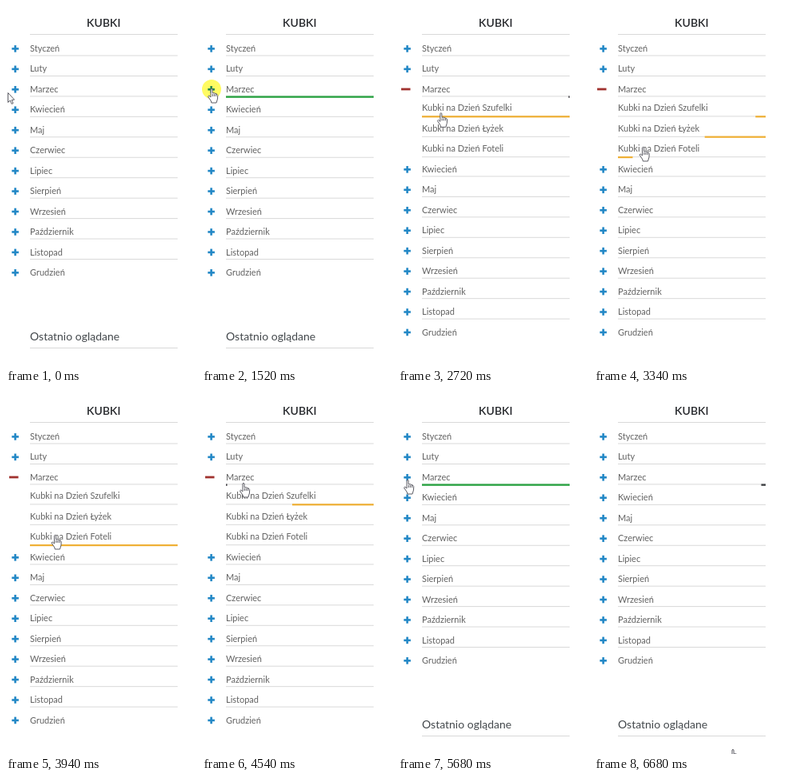
An HTML page with a canvas that plays this animation: 238 by 450 pixels, repeating every 6.78 s.

```html
<!DOCTYPE html>
<html lang="pl">
<head>
<meta charset="utf-8">
<title>Kubki</title>
<style>
  html, body { margin: 0; width: 100%; height: 100%; overflow: hidden; background: #fff; }
  canvas { display: block; }
</style>
</head>
<body>
<canvas id="stage" width="238" height="450"></canvas>
<script>
const ctx = document.getElementById('stage').getContext('2d');
const LOOP = 6780, STEP = 101.2, LEAD = 18;
const LEFT = 30, RIGHT = 215, WIDTH = RIGHT - LEFT;
const FIRST_ROW = 53, ROW = 25.45, OPEN_INDEX = 2, OPEN_SHIFT = 74.6;
const OPEN_AT = 1610, CLOSE_AT = 5660, CLICK = 105;
const DARK = [64, 62, 68], GREEN = [44, 164, 68];
const BLUE = '#2388c6', RED = '#a0322f', ORANGE = '#efb034';

const months = ['Styczeń', 'Luty', 'Marzec', 'Kwiecień', 'Maj', 'Czerwiec',
  'Lipiec', 'Sierpień', 'Wrzesień', 'Październik', 'Listopad', 'Grudzień'];

// Each hover is [enter, leave] in ms.
const monthHovers = [[200, 2025], [4540, 6055]];
const mugs = [
  { name: 'Kubki na Dzień Szufelki', hovers: [[2030, 3000], [4350, 4525]] },
  { name: 'Kubki na Dzień Łyżek', hovers: [[3120, 3285], [4020, 4180]] },
  { name: 'Kubki na Dzień Foteli', hovers: [[3288, 4020]] }
];

// Pointer moves, each from where the last one ended.
const start = { x: 2, y: 108 };
const moves = [
  { from: 100, to: 600, x: 12, y: 103 },
  { from: 1720, to: 2020, x: 43, y: 118 },
  { from: 2020, to: 2900, x: 55, y: 135 },
  { from: 2900, to: 3340, x: 61.5, y: 176 },
  { from: 3960, to: 4540, x: 52, y: 111 },
  { from: 4540, to: 5260, x: 12, y: 107 },
  { from: 6000, to: 6680, x: 174, y: 444 }
];

const clamp = v => Math.max(0, Math.min(1, v));
const smooth = k => k * k * (3 - 2 * k);

// The screen refreshes about ten times a second.
const snap = t => Math.floor((t + LEAD) / STEP) * STEP;

// The CSS "ease" curve.
function ease(x) {
  let lo = 0, hi = 1;
  for (let i = 0; i < 20; i++) {
    const u = (lo + hi) / 2;
    if (0.75 * u * (1 - u) + u ** 3 < clamp(x)) lo = u; else hi = u;
  }
  return 0.3 * lo * (1 - lo) ** 2 + 3 * lo * lo * (1 - lo) + lo ** 3;
}

// Grows from the left on enter, shrinks to the right on leave.
function underline(t, [enter, leave], duration) {
  if (t <= enter) return { x: LEFT, k: 0 };
  const grown = ease((Math.min(t, leave) - enter) / duration);
  if (t < leave) return { x: LEFT, k: grown };
  const k = grown * (1 - ease((t - leave) / (duration * grown)));
  return { x: RIGHT - WIDTH * k, k };
}

function pointerAt(t) {
  let { x, y } = start;
  for (const m of moves) {
    const k = smooth(clamp((t - m.from) / (m.to - m.from)));
    x += (m.x - x) * k;
    y += (m.y - y) * k;
  }
  return [x, y];
}

function box(x, y, w, h, color) {
  ctx.fillStyle = color;
  ctx.fillRect(x, y, w, h);
}

function text(str, x, y, font, color, align = 'left') {
  ctx.font = font + ' Lato, sans-serif';
  ctx.fillStyle = color;
  ctx.textAlign = align;
  ctx.fillText(str, x, y);
}

function separator(y) {
  box(LEFT, y, WIDTH, 1, '#d9d9d9');
}

function item(name, y) {
  text(name, LEFT, Math.round(y + 4), '11px', '#626262');
}

function plus(y) {
  const c = y + 0.4;
  box(7.3, c - 1.3, 8.6, 2.6, BLUE);
  box(10.3, c - 4.3, 2.6, 8.6, BLUE);
}

function minus(y) {
  box(4, y - 1.3, 11.5, 2.8, RED);
}

function monthUnderline(t) {
  for (const hover of monthHovers) {
    const { x, k } = underline(t, hover, 800);
    const mix = DARK.map((d, c) => d + (GREEN[c] - d) * k);
    box(x, 112.4, WIDTH * k, 2.4, `rgb(${mix.join()})`);
  }
}

function outline(points) {
  ctx.beginPath();
  points.forEach(([x, y]) => ctx.lineTo(x, y));
  ctx.closePath();
  ctx.fillStyle = '#fff';
  ctx.fill();
  ctx.strokeStyle = '#5c5c64';
  ctx.lineWidth = 1;
  ctx.lineJoin = 'round';
  ctx.stroke();
}

function arrow(x, y) {
  ctx.save();
  ctx.translate(x + 0.5, y + 0.5);
  outline([[0, 0], [0, 12], [2.7, 9.5], [4.7, 14], [6.5, 13], [4.6, 9], [8, 8.6]]);
  ctx.restore();
}

function hand(x, y) {
  ctx.save();
  ctx.translate(x - 5, y);
  outline([[4, 1], [5, 0.3], [6, 1], [6.2, 6], [8, 5.7], [10, 6.4], [12, 7.4],
    [12.7, 8.6], [12.5, 13], [11, 18], [4.8, 18], [4.4, 16], [0.5, 10],
    [1.8, 9], [4, 11]]);
  ctx.beginPath();
  for (let k = 6.3; k < 11; k += 2.15) {
    ctx.moveTo(k, 7);
    ctx.lineTo(k, 10);
  }
  ctx.stroke();
  ctx.restore();
}

function clickMark(x, y) {
  ctx.save();
  ctx.globalCompositeOperation = 'multiply';
  ctx.fillStyle = '#fffb62';
  ctx.beginPath();
  ctx.arc(x, y, 12, 0, Math.PI * 2);
  ctx.fill();
  ctx.restore();
}

function draw(t) {
  const open = t >= OPEN_AT && t < CLOSE_AT;
  const shift = open ? OPEN_SHIFT : 0;
  box(0, 0, 238, 450, '#fff');

  text('KUBKI', 122.3, 26, '600 14px', '#26282c', 'center');
  separator(35);

  months.forEach((name, i) => {
    const y = FIRST_ROW + i * ROW + (i > OPEN_INDEX ? shift : 0);
    item(name, y);
    if (i < months.length - 1) separator(y + 8.5);
    if (open && i === OPEN_INDEX) minus(y);
    else plus(y);
  });

  if (open) {
    mugs.forEach(({ name, hovers }, i) => {
      const y = 127.4 + i * 25.4;
      item(name, y);
      separator(y + 10);
      for (const hover of hovers) {
        const { x, k } = underline(t, hover, 500);
        box(x, y + 9.8, WIDTH * k, 2.2, ORANGE);
      }
    });
  }
  monthUnderline(t);

  text('Ostatnio oglądane', LEFT, 418 + shift, '14px', '#44494d');
  separator(427 + shift);

  const [x, y] = pointerAt(t);
  for (const end of [OPEN_AT, CLOSE_AT]) {
    if (t >= end - CLICK && t < end) clickMark(x, y + 1);
  }
  if (t < monthHovers[0][0]) arrow(x, y);
  else hand(x, y);
}

function tick(now) {
  draw(snap(now % LOOP));
  requestAnimationFrame(tick);
}
draw(0);
requestAnimationFrame(tick);
</script>
</body>
</html>
```
